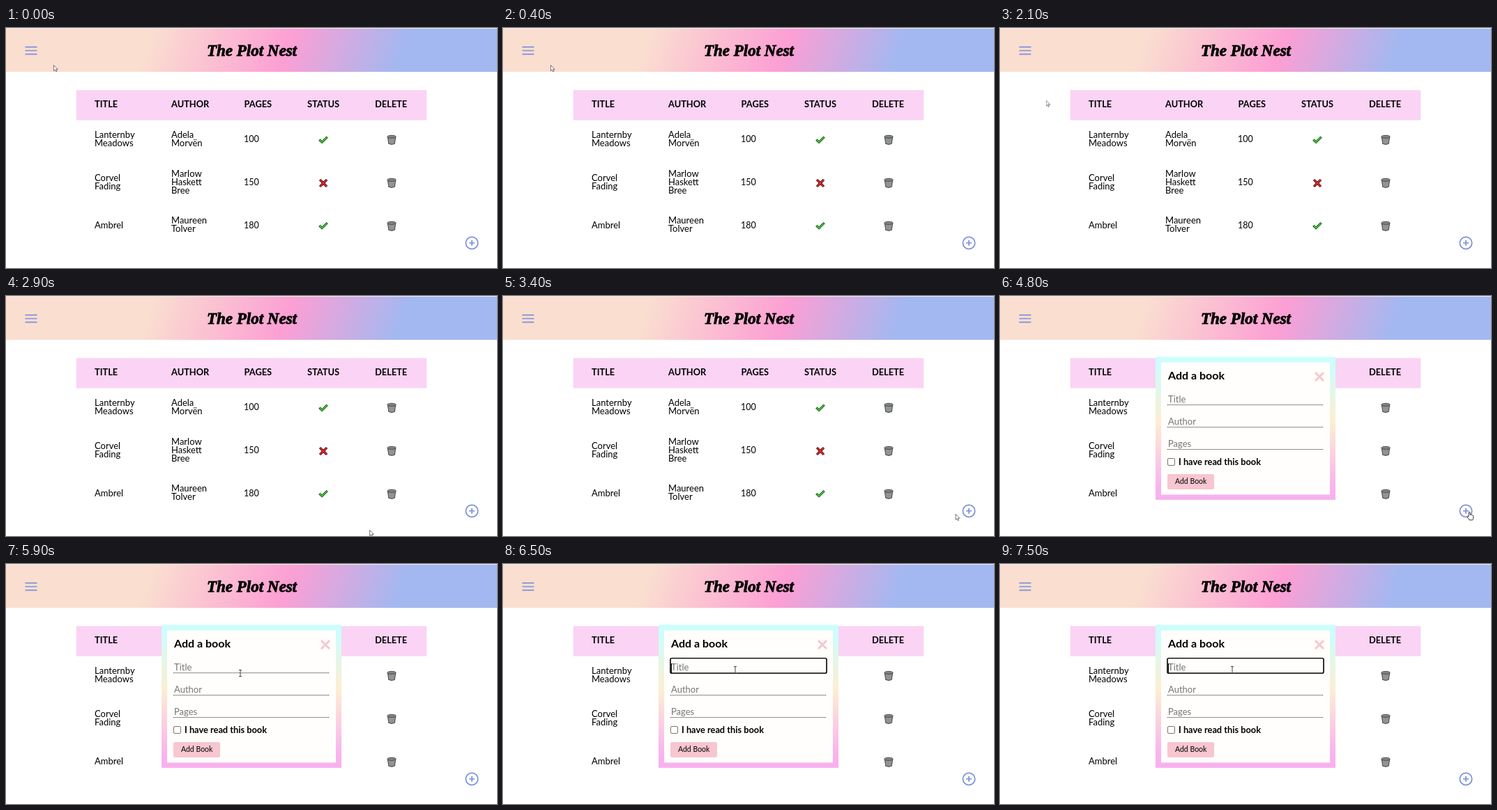
An HTML page for the animation above (8 s loop, 704 by 345 pixels).

```html
<!DOCTYPE html>
<html lang="en">
<head>
<meta charset="utf-8">
<title>Reading list</title>
<style>
  html, body { margin: 0; width: 100%; height: 100%; overflow: hidden; background: #fff; }
  svg { display: block; position: absolute; left: 0; top: 0; width: 704px; height: 345px; }
  text { font: 13px Lato, "Open Sans", sans-serif; fill: #000; }
  header {
    position: absolute; left: 0; top: 0; width: 704px; height: 62px;
    border-top: 1px solid #eeeef0;
    background: linear-gradient(109.6deg, #fadfd0 29%, #fc9fd4 57%, #a3b8f1 80%);
    background-clip: padding-box;
  }
  .logo {
    font: italic 700 23px "Liberation Serif", "Noto Serif", serif;
    text-anchor: middle; stroke: #000; stroke-width: .8px;
  }
  .bold text, text.bold { font-weight: 700; }
  .bold text { font-size: 12.8px; }
  .pages text { font-size: 12.5px; }
  .hint text { fill: #757575; }
  .dots { stroke: #222; stroke-dasharray: 1 1; }
  .blue { fill: none; stroke: #7b90da; stroke-width: 1.7; }

  .modal, .focus, .caret, .cursor, .cursor g { animation: 8s step-end infinite; }
  .modal { animation-name: modal; }
  .focus { animation-name: focus; }
  .caret { animation-name: caret; }
  .cursor { animation-name: travel; }
  .cursor .arrow { animation-name: arrow; }
  .cursor .hand { animation-name: hand; }
  .cursor .beam { animation-name: beam; }

  @keyframes modal { 0% { opacity: 0 } 60%, 100% { opacity: 1 } }
  @keyframes focus { 0% { opacity: 0 } 81.25%, 100% { opacity: 1 } }
  @keyframes caret { 0% { opacity: 0 } 81.25% { opacity: 1 } 87.5% { opacity: 0 } 93.75%, 100% { opacity: 1 } }
  @keyframes arrow { 0% { opacity: 1 } 46.25% { opacity: 0 } 68.75% { opacity: 1 } 73.75%, 100% { opacity: 0 } }
  @keyframes hand { 0% { opacity: 0 } 46.25% { opacity: 1 } 68.75%, 100% { opacity: 0 } }
  @keyframes beam { 0% { opacity: 0 } 73.75%, 100% { opacity: 1 } }

  /* the pointer advances once every 100 ms */
  @keyframes travel {
    0% { transform: translate(68px, 53px) }
    26.25% { transform: translate(65.5px, 103.5px); animation-timing-function: steps(3) }
    30% { transform: translate(203px, 290px); animation-timing-function: steps(3) }
    33.75% { transform: translate(418px, 337px); animation-timing-function: steps(2) }
    36.25% { transform: translate(521px, 336px); animation-timing-function: steps(5) }
    42.5% { transform: translate(648.5px, 313px); animation-timing-function: steps(4) }
    47.5% { transform: translate(673px, 310px) }
    66.25% { transform: translate(673px, 310px); animation-timing-function: steps(2) }
    68.75% { transform: translate(610px, 290px); animation-timing-function: steps(2) }
    71.25% { transform: translate(445px, 240px); animation-timing-function: steps(2) }
    73.75% { transform: translate(336px, 157px); animation-timing-function: steps(3) }
    77.5%, 100% { transform: translate(333px, 152px) }
  }
</style>
</head>
<body>
<header></header>
<svg viewBox="0 0 704 345">
  <defs>
    <linearGradient id="frame" x1="0" y1="0" x2="0" y2="1">
      <stop offset="0" stop-color="#cbfefd"/>
      <stop offset=".08" stop-color="#cffdf9"/>
      <stop offset=".45" stop-color="#fdeed2"/>
      <stop offset=".9" stop-color="#f8b4ee"/>
      <stop offset="1" stop-color="#f8b0ef"/>
    </linearGradient>
    <pattern id="mesh" width="2" height="2" patternUnits="userSpaceOnUse">
      <rect width="2" height="2" fill="#b4b8ba"/>
      <path d="M0 0h1v1H0zM1 1h1v1H1z" fill="#6c7072"/>
    </pattern>
    <path id="tick" d="M-6.300 .7L-4.500-1.100-1.800 1.300 4.500-5 6.200-3.300-1.800 4.700Z"
      fill="#3bd130" stroke="#123d10" stroke-linejoin="round"/>
    <path id="cross" d="M-5.600-3.900L-3.900-5.600 0-1.900 3.900-5.600 5.600-3.900 1.900 0 5.600 3.900 3.900 5.600 0 1.900-3.900 5.600-5.600 3.900-1.900 0Z"
      fill="#e3262b" stroke="#3a0a0a" stroke-linejoin="round"/>
    <g id="bin" stroke="#333" stroke-width=".9">
      <path d="M-5.600-4L-4.300 5.300Q0 7.600 4.300 5.300L5.600-4Z" fill="url(#mesh)"/>
      <ellipse cy="-4.700" rx="6.200" ry="2" fill="#9a9ea0"/>
      <path d="M-4-4.700H4" stroke="#666"/>
    </g>
  </defs>

  <path class="blue" d="M27.500 27.300h17M27.500 32.500h17M27.500 37.700h17"/>
  <text class="logo" x="352.5" y="40">The Plot Nest</text>

  <path d="M100.700 89.200h502.500v43.200H100.700z" fill="#fad3f5"/>
  <g class="bold">
    <text x="127" y="114">TITLE</text>
    <text x="237" y="114">AUTHOR</text>
    <text x="341.5" y="114">PAGES</text>
    <text x="432" y="114">STATUS</text>
    <text x="529" y="114">DELETE</text>
  </g>

  <text y="158"><tspan x="127">Lanternby</tspan><tspan x="127" dy="12">Meadows</tspan></text>
  <text y="158"><tspan x="237">Adela</tspan><tspan x="237" dy="12">Morvën</tspan></text>
  <use href="#tick" x="455" y="161"/>
  <use href="#bin" x="553" y="161"/>

  <text y="219.500"><tspan x="127">Corvel</tspan><tspan x="127" dy="12">Fading</tspan></text>
  <text y="213.500"><tspan x="237">Marlow</tspan><tspan x="237" dy="12">Haskett</tspan><tspan x="237" dy="12">Bree</tspan></text>
  <use href="#cross" x="455" y="223"/>
  <use href="#bin" x="553" y="223"/>

  <text x="127" y="287.500">Ambrel</text>
  <text y="281"><tspan x="237">Maureen</tspan><tspan x="237" dy="11.700">Tolver</tspan></text>
  <use href="#tick" x="455" y="284.500"/>
  <use href="#bin" x="553" y="285"/>

  <g class="pages">
    <text x="341" y="164">100</text>
    <text x="341" y="225.500">150</text>
    <text x="341" y="287.500">180</text>
  </g>

  <g class="blue">
    <circle cx="668" cy="309" r="8.700"/>
    <path d="M664 309h8M668 305v8"/>
  </g>

  <g class="modal">
    <path d="M223 87.500h258V293H223z" fill="url(#frame)"/>
    <path d="M231 95.500h242v190H231z" fill="#fffefd"/>
    <text class="bold" x="241" y="120" style="font-size:16px">Add a book</text>
    <path d="M452 110l12 12M464 110l-12 12" stroke="#f6c6cf" stroke-width="3"/>
    <g class="hint">
      <text x="241" y="153">Title</text>
      <text x="241" y="185">Author</text>
      <text x="241" y="217">Pages</text>
    </g>
    <path class="dots" d="M240 156.500h224M240 188.500h224M240 220.500h224"/>
    <rect x="240.500" y="233.500" width="10" height="10" rx="1.500" fill="#fff" stroke="#767676"/>
    <text class="bold" x="256" y="243" style="font-size:12.800px">I have read this book</text>
    <rect x="240" y="256" width="67" height="22" rx="2.500" fill="#f7c6d1"/>
    <text x="251" y="270" style="font-size:10.500px">Add Book</text>
  </g>

  <rect class="focus" x="240" y="135.500" width="224" height="21.500" rx="2" fill="none" stroke="#101010" stroke-width="1.700"/>
  <path class="caret" d="M241.500 143v13" stroke="#000"/>

  <g class="cursor">
    <g class="arrow">
      <path d="M.5.5V8.700L2.400 7 3.700 9.800 5 9.200 3.800 6.500H6.200Z" fill="#fff" stroke="#555" stroke-width=".8" stroke-linejoin="round"/>
    </g>
    <g class="hand">
      <path d="M-1 7V1.200Q0-.3 1 1.200V4.500Q2 3.800 2.700 4.800 3.700 4.200 4.300 5.200 5.700 5 5.700 6.400V9Q5.500 10.500 4.700 12H-.2Q-.6 10.800-1.300 10.200L-3 7.800Q-2.700 6-1 7Z" fill="#fff" stroke="#222" stroke-width=".9" stroke-linejoin="round"/>
    </g>
    <g class="beam">
      <path d="M-2-4.500H2M-2 4.500H2M0-4.500V4.500" fill="none" stroke="#444"/>
    </g>
  </g>
</svg>
</body>
</html>
```
